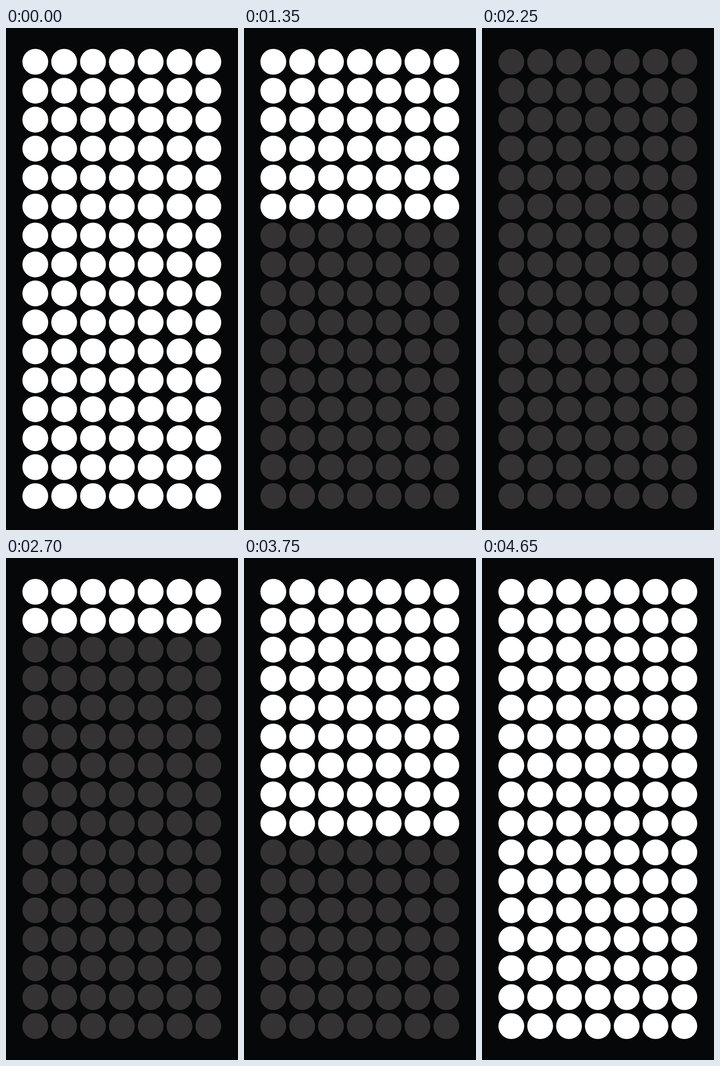
Animation of 509 by 1100 pixels, one loop 4.8 s. Source, as an HTML page with a canvas:

```html
<!DOCTYPE html>
<html>
<head>
<meta charset="utf-8">
<style>
  html, body { margin: 0; height: 100%; overflow: hidden; background: #050708; }
  canvas { display: block; }
</style>
</head>
<body>
<canvas width="509" height="1100"></canvas>
<script>
const COLS = 7, ROWS = 16, STEP_MS = 150, STEPS = 32;
const ctx = document.querySelector('canvas').getContext('2d');

// Rows lit from the top: falls to none, then rises; the count of ten is skipped.
function litRows(step) {
  const n = step < 16 ? 15 - step : step - 16;
  return n > 9 ? n + 1 : n;
}

function draw(now) {
  const lit = litRows(Math.floor(now / STEP_MS) % STEPS);
  ctx.fillStyle = '#050708';
  ctx.fillRect(0, 0, 509, 1100);
  for (let row = 0; row < ROWS; row++) {
    ctx.fillStyle = row < lit ? '#fff' : '#353233';
    for (let col = 0; col < COLS; col++) {
      ctx.beginPath();
      ctx.arc(64.3 + 63.27 * col, 74 + 63.45 * row, 28.3, 0, 2 * Math.PI);
      ctx.fill();
    }
  }
}

const start = performance.now();
function tick() {
  draw(performance.now() - start);
  requestAnimationFrame(tick);
}
tick();
</script>
</body>
</html>
```
